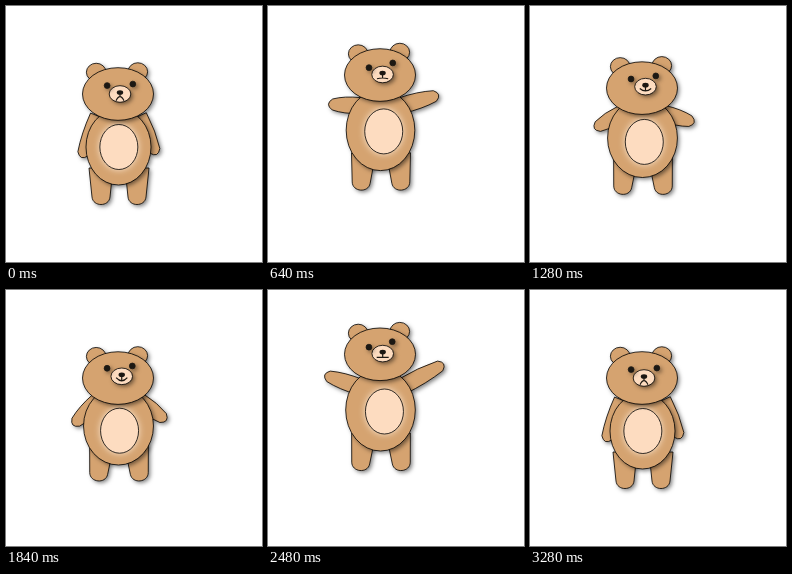
Recreate the animation shown at these times as an HTML page with a canvas. Size 256x256 px, loop 3360 ms.

```html
<!DOCTYPE html>
<html lang="en">
<head>
<meta charset="utf-8">
<title>Jumping bear</title>
<style>
html, body { margin: 0; width: 100%; height: 100%; overflow: hidden; background: #fff; }
canvas { display: block; }
</style>
</head>
<body>
<canvas id="stage" width="256" height="256"></canvas>
<script>
const ctx = document.getElementById('stage').getContext('2d');
const FUR = '#d5a370', CREAM = '#fddcc0', INK = '#1c1813';
const SHADOW = 'rgba(0,0,0,.5)';
const SIDES = [-1, 1];
const MID = 112.5;

const oval = (x, y, rx, ry = rx) => {
  const p = new Path2D();
  p.ellipse(x, y, rx, ry, 0, 0, 7);
  return p;
};

// Places a shape at x, y, turned by an angle in radians.
const place = (d, x, y, angle) => {
  const p = new Path2D();
  p.addPath(new Path2D(d), new DOMMatrix().translate(x, y).rotate(angle * 180 / Math.PI));
  return p;
};

const leg = (x, y, angle) =>
  place('M-12-36L-9-7C-8 3 8 3 9-7L12-36Z', x, y, angle);

// A tapered limb with a round end, from shoulder to fingertip.
const arm = (x, y, tipX, tipY) => {
  const len = Math.hypot(tipX - x, tipY - y), end = len - 4;
  const d = `M0-8Q${len / 2}-9 ${end}-5.5Q${len + 4} 0 ${end} 5.5Q${len / 2} 9 0 8Z`;
  return place(d, x, y, Math.atan2(tipY - y, tipX - x));
};

function paint(path, fill = FUR, shadow = SHADOW, shift = 2, blur = 4) {
  ctx.save();
  ctx.shadowColor = shadow;
  ctx.shadowOffsetX = ctx.shadowOffsetY = shift;
  ctx.shadowBlur = blur;
  ctx.fillStyle = fill;
  ctx.fill(path);
  ctx.restore();
  ctx.stroke(path);
}

function draw(now) {
  // Standing, top of the jump, crouching; then the same steps backwards.
  const step = Math.floor(now / 80) % 42;
  const u = Math.min(step, 41 - step) / 10;
  const key = (stand, top, crouch) =>
    u < 1 ? stand + (top - stand) * u : top + (crouch - top) * (u - 1);

  const tilt = key(1.5, 5.5, 1.5);
  const pitch = key(0, .7, 2);
  const smile = key(-1, 0, 1);
  const headY = key(88, 64.3, 94);
  const bodyY = key(141, 120, 140);
  const footY = key(198, 180, 193);
  const spread = key(18, 21, 21);
  const shoulderY = key(110, 97, 114);
  const reach = key(37.5, 59.5, 43.5);
  const handY = key(150, 79.5, 146);

  ctx.clearRect(0, 0, 256, 256);
  ctx.strokeStyle = '#000';
  ctx.lineWidth = .8;

  for (const s of SIDES)
    paint(leg(MID + .5 + s * spread, footY, -s * (spread - 18) / 30));
  for (const s of SIDES)
    paint(arm(MID + s * 20.5, shoulderY, 111.8 + .8 * tilt + s * reach, handY - s * tilt));

  paint(oval(MID, bodyY, key(32.5, 34.8, 35), key(38, 41, 38.5)));
  paint(oval(111.5 + .9 * tilt, bodyY + key(0, 1.5, 5.5), 19, 22.5), CREAM, '#ffeedd', 0, 7);

  for (const s of SIDES)
    paint(oval(111 + s * 20.8, headY - 22 - s * tilt / 6, 9.8, 9));
  paint(oval(112, headY, 35.5, 26.3));

  const x = 114 + pitch, y = headY - pitch;
  paint(oval(x, y, 10.8, 8.3), CREAM);

  ctx.strokeStyle = INK;
  for (const s of SIDES) {
    const eyeX = 114.5 - .35 * tilt + s * (13.3 - .3 * tilt);
    paint(oval(eyeX, y - 9.2 - s * tilt / 2, 2.9), INK);
  }
  ctx.fillStyle = INK;
  ctx.fill(oval(x, y - 1.5, 3.2, 2.3));

  const wide = key(4, 6, 5.5), ends = y + 3.7 - 3 * smile;
  ctx.lineWidth = 1.2;
  ctx.beginPath();
  ctx.moveTo(x, y - 1.5);
  ctx.lineTo(x, y + 3.7 + smile);
  ctx.moveTo(x - wide, ends);
  ctx.quadraticCurveTo(x, y + 3.7 + 5 * smile, x + wide, ends);
  ctx.stroke();
}

function tick() {
  draw(performance.now());
  requestAnimationFrame(tick);
}
tick();
</script>
</body>
</html>
```
